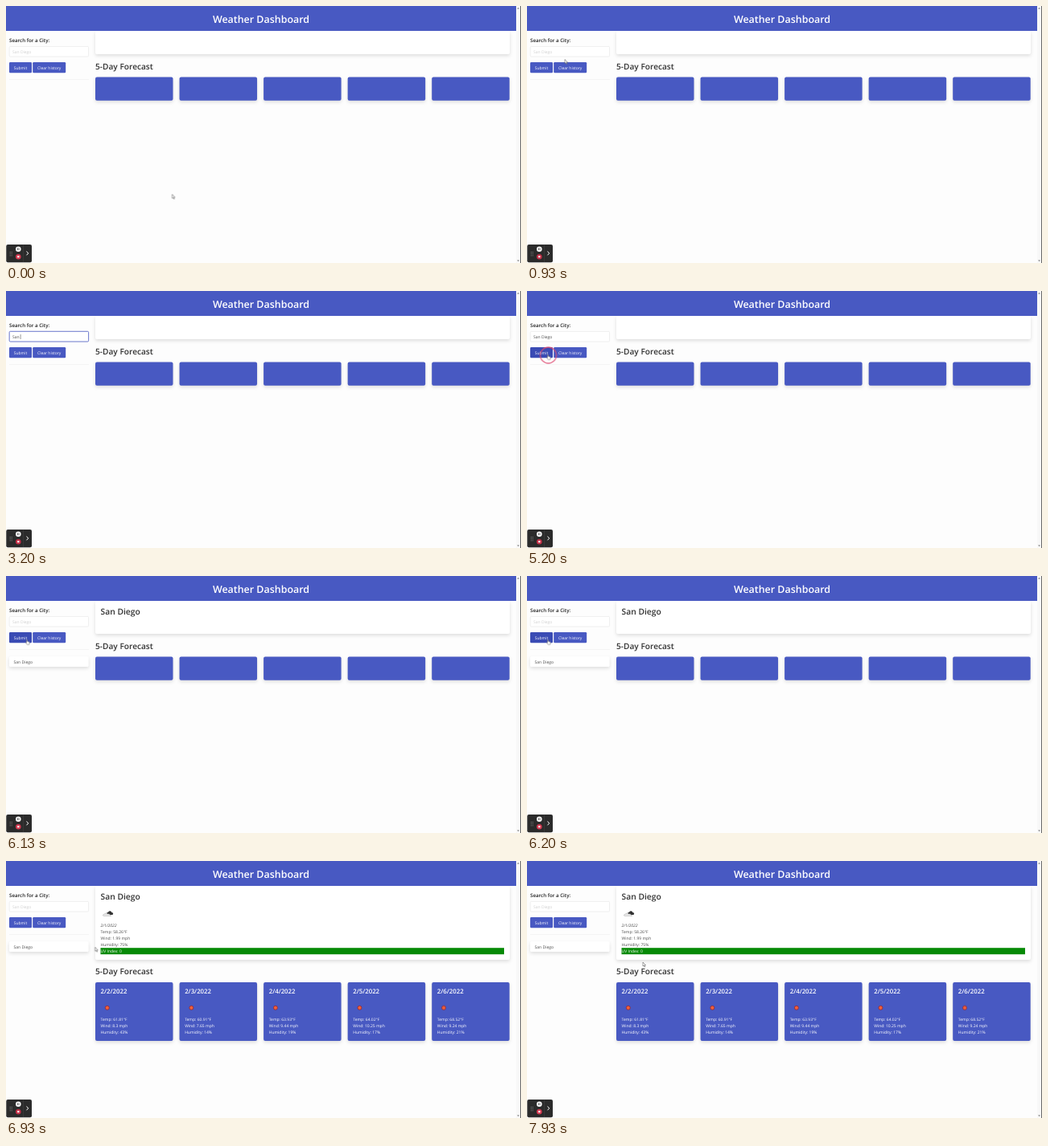
An HTML page that plays this animation: 640x320 px, repeating every 8 s.

```html
<!DOCTYPE html>
<html lang="en">
<head>
<meta charset="utf-8">
<title>Weather Dashboard</title>
<style>
html, body { margin: 0; width: 100%; height: 100%; overflow: hidden; background: #fdfdfd; }
svg { display: block; width: 640px; height: 320px; font: 5px "Open Sans", "Noto Sans", sans-serif; text-rendering: geometricPrecision; }
.blue { fill: #4859c2; }
.white { fill: #fff; }
.dark { fill: #333; }
.body { fill: #4a4a4a; }
.bold { font-weight: 600; }
.mid { text-anchor: middle; }
.box { filter: drop-shadow(0 2px 2.2px rgba(10, 10, 10, .13)); }
.italic { font-style: italic; }

.step, .hide { animation: 8s step-end infinite; }
.hide { visibility: hidden; }
#now { animation-name: now; }
#forecast { animation-name: shift; }
.day { animation-name: day; }
.lines { animation-name: lines; }
.city { animation-name: city; }
.data { animation-name: data; }
.suns { animation-name: suns; }
#focus { animation-name: focus; }
#submit { animation-name: submit; }
#clear { animation-name: clear; }
#arrow { animation-name: arrow; }
#beam { animation-name: beam; }
#hand { animation-name: hand; }
#mouse { animation: move 8s linear infinite; }
.ring { fill: none; stroke: #de4a72; stroke-width: 1.3; opacity: 0; animation: 8s linear infinite; }
#ring1 { animation-name: ring1; }
#ring2 { animation-name: ring2; }
#stop { animation: pulse 1s ease-in-out infinite alternate; }

@keyframes now { 0% { height: 29px; } 67.5% { height: 41px; } 78.25%, to { height: 92px; } }
@keyframes shift { 0% { transform: none; } 67.5% { transform: translateY(12px); } 78.25%, to { transform: translateY(62.7px); } }
@keyframes day { 0% { height: 29.3px; } 78.25% { height: 62px; } 80.75%, to { height: 73px; } }
@keyframes lines { 0% { transform: none; } 80.75%, to { transform: translateY(10.6px); } }
@keyframes city { 0% { visibility: hidden; } 67.5%, to { visibility: visible; } }
@keyframes data { 0% { visibility: hidden; } 78.25%, to { visibility: visible; } }
@keyframes suns { 0% { visibility: hidden; } 80.75%, to { visibility: visible; } }
@keyframes focus { 0% { visibility: hidden; } 17.5% { visibility: visible; } 62.5%, to { visibility: hidden; } }
@keyframes submit { 0% { fill: #4859c2; } 59.5% { fill: #3a4bb4; } 78.6%, to { fill: #4859c2; } }
@keyframes clear { 0% { fill: #4859c2; } 78.7% { fill: #3f50ba; } 82%, to { fill: #4859c2; } }
@keyframes arrow {
  0% { visibility: visible; } 12.5% { visibility: hidden; } 57% { visibility: visible; }
  59.5% { visibility: hidden; } 82%, to { visibility: visible; }
}
@keyframes beam {
  0% { visibility: hidden; } 12.5% { visibility: visible; } 33.25% { visibility: hidden; }
  55.75% { visibility: visible; } 57%, to { visibility: hidden; }
}
@keyframes hand { 0% { visibility: hidden; } 59.5% { visibility: visible; } 82%, to { visibility: hidden; } }
@keyframes move {
  0%, .75% { transform: translate(206.5px, 234.5px); animation-timing-function: ease-in-out; }
  10.75%, 11.7% { transform: translate(47px, 66.5px); }
  14.1%, 55.75% { transform: translate(42px, 57px); animation-timing-function: ease-in-out; }
  60.75%, 78% { transform: translate(26px, 79.5px); }
  79.1% { transform: translate(39px, 77.5px); }
  83.25%, 84.1% { transform: translate(80px, 93px); animation-timing-function: ease-out; }
  90.75%, 92.5% { transform: translate(136px, 119px); }
  99%, to { transform: translate(144px, 126px); }
}
@keyframes ring1 {
  0%, 16.6% { opacity: 0; transform: translate(42px, 57px) scale(.4); }
  16.7% { opacity: .8; transform: translate(42px, 57px) scale(.4); }
  19% { opacity: .8; transform: translate(42px, 57px); }
  22.5%, to { opacity: 0; transform: translate(42px, 57px) scale(1.1); }
}
@keyframes ring2 {
  0%, 62.4% { opacity: 0; transform: translate(26.5px, 80px) scale(.4); }
  62.5% { opacity: .8; transform: translate(26.5px, 80px) scale(.4); }
  65% { opacity: .8; transform: translate(26.5px, 80px); }
  68.5%, to { opacity: 0; transform: translate(26.5px, 80px) scale(1.1); }
}
@keyframes pulse { from { fill: #d63a52; } to { fill: #c22f47; } }
</style>
</head>
<body>
<svg viewBox="0 0 640 320">
  <rect id="now" class="box white step" x="111" y="31" width="515" height="29" rx="2"/>
  <rect class="blue" width="634" height="31"/>
  <text class="white bold mid" x="317" y="20.8" font-size="12.45">Weather Dashboard</text>

  <text class="bold" x="4" y="45.3" font-size="6.2" fill="#222">Search for a City:</text>
  <rect x="4.2" y="50.4" width="98.4" height="12.6" rx="1.2" fill="#fff" stroke="#dedede" stroke-width=".5"/>
  <rect id="focus" class="hide" x="4.2" y="50.3" width="98.4" height="12.7" rx="1.2" fill="#fff" stroke="#4859c2" stroke-width=".8"/>
  <text id="field" x="8" y="58.7"></text>
  <path id="caret" d="M0 54v6" stroke="#333" stroke-width=".5"/>
  <rect id="submit" class="blue step" x="4" y="70" width="28" height="13.2" rx="1.2"/>
  <text class="white mid" x="18" y="78.5">Submit</text>
  <rect id="clear" class="blue step" x="33.2" y="70" width="41" height="13.2" rx="1.2"/>
  <text class="white mid" x="53.7" y="78.5">Clear history</text>
  <path d="M4 91.5H103" stroke="#f3f3f3" stroke-width=".8"/>
  <g class="city hide">
    <rect class="box white" x="4" y="100.2" width="98.6" height="12.8" rx="1.5"/>
    <text class="body" x="9.6" y="108.5">San Diego</text>
    <text class="dark bold" x="117.6" y="48" font-size="10.3">San Diego</text>
  </g>

  <g class="data hide body">
    <path fill="#333" d="M125 65.5q.3-2 2-1.800q1-2.200 3-1.200q1.300.4 1.200 1.500q2.200.2 2 1.800q-.2 1.200-1.600 1.200h-5z"/>
    <path fill="#e4e4e4" stroke="#8a8a8a" stroke-width=".3" d="M121.500 68.600q-1.500-.2-1-1.500q.4-1 1.700-.9q.8-1.700 2.700-1.200q1 .2 1.500 1q2-.6 2.800 1q2 .1 1.300 1.600z"/>
    <text class="italic" x="117.600" y="82.300">2/1/2022</text>
    <text x="117.600" y="90.300">Temp: 58.26°F</text>
    <text x="117.600" y="98.300">Wind: 1.99 mph</text>
    <text x="117.600" y="106.200">Humidity: 75%</text>
    <rect x="117.500" y="108.200" width="501.500" height="8" fill="#078a07"/>
    <text class="white" x="117.600" y="114.200">UV Index: 0</text>
  </g>

  <g id="forecast" class="step">
    <text class="dark bold" x="111" y="78.500" font-size="10.150">5-Day Forecast</text>
  </g>

  <rect x="634" width="6" height="320" fill="#f8f8f8"/>
  <path d="M639.600 0V320" stroke="#333" stroke-width=".8"/>
  <path d="M635.200 3.500l1.300-1.600 1.300 1.600zM635.200 316.500l1.300 1.600 1.300-1.600z" fill="#666"/>

  <rect x=".3" y="297" width="31.700" height="22.300" rx="2" fill="#2b2b2b"/>
  <path d="M21.500 297.500v21.500" stroke="#444" stroke-width=".5"/>
  <path d="M5.200 306v5.500M7.200 306v5.500" stroke="#999" stroke-width=".9" stroke-dasharray=".9 1.300"/>
  <circle class="white" cx="15.300" cy="302.700" r="3.300"/>
  <path d="M14.500 301.300v2.800M16.100 301.300v2.800" stroke="#333" stroke-width=".7"/>
  <circle id="stop" cx="15.300" cy="312.200" r="3.300" fill="#d63a52"/>
  <rect class="white" x="14.200" y="311.100" width="2.200" height="2.200" rx=".3"/>
  <path d="M25.500 305.500l2.200 2.400-2.200 2.400" fill="none" stroke="#fff" stroke-width="1"/>

  <circle id="ring1" class="ring" r="10"/>
  <circle id="ring2" class="ring" r="10"/>
  <g id="mouse" stroke-linejoin="round">
    <path id="arrow" class="hide" d="M0 0v5l1.200-1 .9 1.900.8-.4-.9-1.800h1.500z" fill="#fff" stroke="#444" stroke-width=".5"/>
    <path id="beam" class="hide" d="M-1-2.800h2M0-2.800v5.600M-1 2.800h2" fill="none" stroke="#444" stroke-width=".5"/>
    <path id="hand" class="hide" d="M-.5 0q.6-.5 1.100 0v2l2.300.6q.5.200.4 1l-.5 2.200H.2l-1.800-2.300q.3-.8 1.100 0z" fill="#fff" stroke="#333" stroke-width=".4"/>
  </g>
</svg>
<script>
const days = [
  ["61.81", "8.3", 43], ["60.91", "7.65", 14], ["63.93", "9.44", 19],
  ["64.02", "10.25", 17], ["68.52", "9.24", 21]
];
const forecast = document.getElementById("forecast");
forecast.innerHTML += days.map(([temp, wind, humid], i) => {
  const x = 111 + i * 104.55, left = x + 6.6;
  return `<rect class="box blue day step" x="${x}" y="88.4" width="96.5" height="29.3" rx="2"/>
    <g class="white data hide">
      <text class="bold" x="${left}" y="102.6" font-size="7.8">2/${i + 2}/2022</text>
      <g class="lines step">
        <text x="${left}" y="126">Temp: ${temp}°F</text>
        <text x="${left}" y="134">Wind: ${wind} mph</text>
        <text x="${left}" y="142">Humidity: ${humid}%</text>
      </g>
    </g>
    <circle class="suns hide" cx="${x + 14.8}" cy="120.1" r="2.5" fill="#f0603a" stroke="#8c2030" stroke-width=".7"/>`;
}).join("");

const city = "San Diego";
const keys = [2660, 2800, 2930, 3060, 3270, 3460, 3600, 3740, 3900];
const field = document.getElementById("field");
const caret = document.getElementById("caret");
const clock = document.getElementById("mouse").getAnimations()[0];

function draw() {
  const t = (clock.currentTime || 0) % 8000;
  const count = t < 5400 ? keys.filter(k => k <= t).length : 0;
  const text = city.slice(0, count);
  field.style.whiteSpace = "pre";
  field.textContent = text || city;
  field.setAttribute("fill", text ? "#4a4a4a" : "#cfcfcf");
  const end = text ? field.getComputedTextLength() : 0;
  caret.setAttribute("transform", `translate(${8.2 + end} 0)`);
  const typing = t > 2600 && t < 4000;
  const blink = (t - 1400) % 1060 < 530;
  caret.style.visibility = t > 1400 && t < 5000 && (typing || blink) ? "visible" : "hidden";
  requestAnimationFrame(draw);
}
draw();
</script>
</body>
</html>
```
